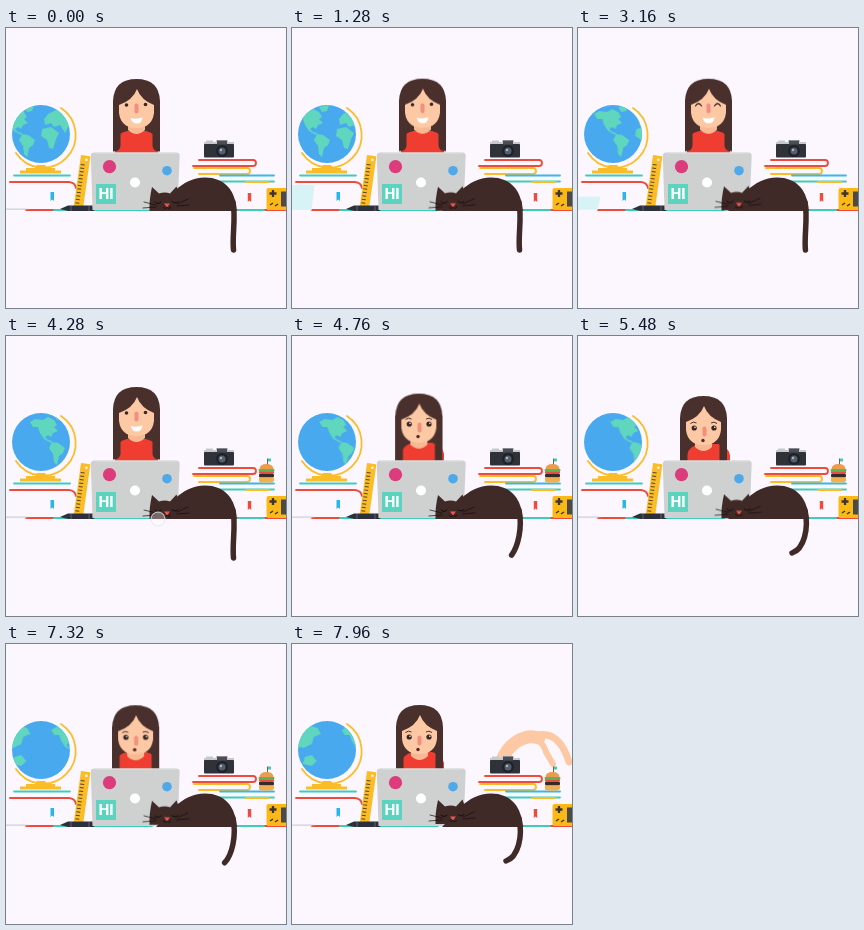
Recreate the animation shown at these times as an HTML page. Size 280 px wide and 280 px high, loop 8000 ms.

```html
<!DOCTYPE html>
<html lang="en">
<head>
<meta charset="utf-8">
<title>Desk with a sleeping cat</title>
<style>
  html, body { margin: 0; width: 100%; height: 100%; overflow: hidden; background: #fcf7ff; }
  svg { display: block; width: 100vw; height: 100vh; }
  .line { fill: none; stroke-width: 1.8; stroke-linecap: round; }
  .red { stroke: #ee4b3c; } .teal { stroke: #3fcdbb; } .blue { stroke: #35b9e6; } .gold { stroke: #fbbd27; }
  .skin { fill: #fdc9a4; } .hair { fill: #4a302d; } .cat { fill: #402a28; }
  .limb { fill: none; stroke: #fdc9a4; stroke-linecap: round; }
  .anim { animation: 8s linear infinite; }

  #land { animation-name: spin; }
  @keyframes spin { from { transform: translateX(11px); } to { transform: translateX(67px); } }

  #tablet { animation-name: lift; transform-origin: 0 182px; }
  @keyframes lift {
    0%, 4% { transform: scaleY(.06); animation-timing-function: ease-out; }
    16%, 33% { transform: scaleY(1); animation-timing-function: ease-in; }
    43%, 100% { transform: scaleY(.06); }
  }
  #slab { animation-name: slab; }
  @keyframes slab { 0%, 4%, 43%, 100% { fill: #ccd2d8; } 9%, 40% { fill: #d8f3f6; } }

  .face { animation-name: turn; }
  @keyframes turn {
    0%, 14%, 22%, 33%, 42%, 55% { transform: none; animation-timing-function: ease-in-out; }
    18%, 36% { transform: translateY(-.6px); animation-timing-function: ease-in-out; }
    62%, 74% { transform: translate(-5px, 9px); animation-timing-function: ease-in-out; }
    79%, 87% { transform: translate(5px, 11px); animation-timing-function: ease-in-out; }
    94%, 100% { transform: translate(-3px, 10px); }
  }
  #body { animation-name: duck; }
  @keyframes duck {
    0%, 55% { transform: none; animation-timing-function: ease-in-out; }
    62%, 100% { transform: translateY(5px); }
  }
  #look { animation-name: look; }
  @keyframes look {
    0%, 55% { transform: none; animation-timing-function: ease-in-out; }
    62%, 74% { transform: translate(1px, 6px); animation-timing-function: ease-in-out; }
    79%, 87% { transform: translate(2px, 6px); animation-timing-function: ease-in-out; }
    94%, 100% { transform: translate(0, 6px); }
  }
  #open { animation-name: open; }
  @keyframes open { 0%, 26.9% { opacity: 1; } 27%, 43.9% { opacity: 0; } 44%, 100% { opacity: 1; } }
  #shut { animation-name: shut; }
  @keyframes shut { 0%, 26.9% { opacity: 0; } 27%, 43.9% { opacity: 1; } 44%, 100% { opacity: 0; } }
  #smile { animation-name: smile; }
  @keyframes smile { 0%, 58.9% { opacity: 1; } 59%, 100% { opacity: 0; } }
  #gasp { animation-name: gasp; }
  @keyframes gasp { 0%, 58.9% { opacity: 0; } 59%, 100% { opacity: 1; } }

  #tail { animation-name: wag; }
  @keyframes wag {
    0%, 16%, 40%, 54%, 78%, 85% { d: path("M227 174C230 190 226 207 227.500 222"); animation-timing-function: ease-in-out; }
    24%, 31%, 64%, 70%, 96%, 100% { d: path("M227 174C231 193 226 213 214 217"); animation-timing-function: ease-in-out; }
  }
  #head { animation-name: nod; }
  @keyframes nod {
    0%, 11%, 31%, 45%, 58%, 75%, 85% { transform: none; animation-timing-function: ease-in-out; }
    24%, 38%, 68% { transform: translateY(-.7px); animation-timing-function: ease-in-out; }
    95%, 100% { transform: translateY(-3px); }
  }
  #bubble { animation-name: snore; transform-origin: 157px 180px; }
  @keyframes snore {
    0%, 20%, 31%, 46%, 58%, 73%, 85%, 100% { transform: scale(0); }
    26.5%, 53.5%, 80.5% { transform: scale(1); }
  }

  #burger { animation-name: serve; }
  @keyframes serve {
    0%, 44% { transform: translateX(32px); animation-timing-function: ease-out; }
    50%, 100% { transform: none; }
  }
  #arm { animation-name: reach; }
  @keyframes reach {
    0%, 94% { transform: translate(-22px, 62px); animation-timing-function: ease-out; }
    99%, 100% { transform: none; }
  }
</style>
</head>
<body>
<svg viewBox="0 0 280 280">
  <defs>
    <clipPath id="ball"><circle cx="35" cy="106" r="29"/></clipPath>
    <clipPath id="above"><path d="M180 60H280V155H251V132H180Z"/></clipPath>
  </defs>

  <!-- globe -->
  <path class="line gold" stroke-width="1.5" d="M55 80A32.500 32.500 0 1 1 10 125"/>
  <path d="M31 137H39L41 140H49V142.500H55V145.500H14V142.500H20V140H29Z" fill="#fbbd27"/>
  <circle cx="35" cy="106" r="29" fill="#49a9ee"/>
  <g clip-path="url(#ball)">
    <g id="land" class="anim" fill="#5fd6bd">
      <path d="M-17 86L-12 83-4 84 1 81 7 84 10 89 7 91 11 95 6 97 4 101 1 99-2 101 1 104 5 105 4 107-3 103-7 97-9 91-14 91Z"/>
      <path d="M5 106L11 107 18 112 16 117 12 120 10 129 7 126 6 118 2 112Z"/>
      <path d="M7 79L17 77 15 83 10 84Z"/>
      <path d="M27 91L31 86 39 82 62 82 65 89 58 93 56 102 51 99 48 105 43 97 37 99 34 95 28 97Z"/>
      <path d="M25 101L34 99 42 105 39 111 36 121 32 120 30 112 24 108Z"/>
      <path d="M-72 83L-52 81-41 84-38 90-45 93-47 100-55 104-59 103-64 107-70 98Z"/>
      <path d="M-54 113L-47 111-42 117-47 122-56 120Z"/>
    </g>
  </g>

  <!-- left books -->
  <path class="line teal" d="M8 147.500H64"/>
  <path class="line red" d="M4 154H63Q69 154.500 70 160"/>
  <path d="M44.500 164H48V173L46.200 171.500 44.500 173Z" fill="#2bb5e8"/>

  <!-- woman -->
  <g class="face anim">
    <path class="hair" d="M107 122V73Q108 51 130.500 51T154 73V122Z"/>
  </g>
  <path id="body" class="anim" d="M109 145V114Q110 106 121 103H140Q151 106 152 114V145Z" fill="#ef3d32"/>
  <g class="face anim">
    <path class="hair" d="M107 73H114.500V118Q114 123.500 107 123.500ZM154 73H146.500V118Q147 123.500 154 123.500Z"/>
    <path d="M122 94H139V102Q130.500 110 122 102Z" fill="#f7b994"/>
    <path class="skin" d="M113 77Q127 72 131 61 135 72 148 77V85Q146 100 130.500 100T113 85Z"/>
    <g id="look" class="anim">
      <g id="open" class="anim" fill="#3b2626">
        <circle cx="120.500" cy="77" r="1.800"/><circle cx="139.500" cy="76.500" r="1.800"/>
      </g>
      <g id="shut" class="anim" fill="none" stroke="#3b2626" stroke-width="1.300" stroke-linecap="round">
        <path d="M117.500 78Q120.500 73.500 123.500 78M136.500 78Q139.500 73.500 142.500 78"/>
      </g>
      <path d="M130.500 77.500V83.500" stroke="#f28f80" stroke-width="4" stroke-linecap="round"/>
      <path id="smile" class="anim" d="M124.500 90Q130.500 91.500 136.500 89.500 136 95.500 131 95.500T124.500 90Z" fill="#fff"/>
      <g id="gasp" class="anim">
        <path d="M116.500 72.500Q119.500 70 122.500 72M137 72Q140 70 143 72.500" fill="none" stroke="#4a302d"/>
        <circle cx="120.200" cy="77" r="2.600" fill="#3b2626"/><circle cx="140" cy="77" r="2.600" fill="#3b2626"/>
        <circle cx="121" cy="76.200" r=".8" fill="#fff"/><circle cx="140.800" cy="76.200" r=".8" fill="#fff"/>
        <circle cx="129" cy="89.500" r="1.700" fill="#5c2424"/>
      </g>
    </g>
  </g>

  <!-- reaching arm -->
  <g clip-path="url(#above)">
    <g id="arm" class="anim">
      <path class="limb" stroke-width="13" d="M210 117C215 101 232 89 247 94"/>
      <path class="limb" stroke-width="7" d="M246 91C263 88 272 102 277 118"/>
      <path class="limb" stroke-width="6" d="M246 96Q252 101 254 108L261 120"/>
    </g>
  </g>

  <!-- right books -->
  <path class="line red" d="M193 132H247Q250 132 250 135T247 138H187"/>
  <path class="line gold" d="M188 140H241Q244 140 244 143T241 146H193"/>
  <path class="line blue" d="M214 147.500H268"/>
  <path class="line teal" d="M210 153.500H268"/>
  <path class="line gold" d="M240 154H263"/>
  <path d="M241.800 165H245.200V174L243.500 172.500 241.800 174Z" fill="#ee4b3c"/>

  <!-- camera -->
  <path d="M198 117V114H200V112.500H207V114H210V112H222V114H228V117Z" fill="#c5c9cc"/>
  <rect x="198" y="116" width="30" height="13.500" rx="1" fill="#30323a"/>
  <rect x="211" y="112.500" width="10" height="4" fill="#4b4c55"/>
  <circle cx="216" cy="123" r="6" fill="#202229"/>
  <circle cx="216" cy="123" r="3.500" fill="#555e6c"/>
  <circle cx="215" cy="122" r="1.200" fill="#a9b8c5"/>

  <!-- burger -->
  <g id="burger" class="anim">
    <path d="M261.500 122.500V129" stroke="#8a5a3a"/>
    <path d="M262 122.500H265V125.500H262Z" fill="#3fcdbb"/>
    <path d="M253.500 133Q254 128 260.500 128T267.500 133Z" fill="#eb9c4c"/>
    <rect x="252.500" y="133" width="16" height="2.200" rx="1" fill="#59b75a"/>
    <rect x="253" y="135.200" width="15" height="2.200" fill="#e84d3d"/>
    <rect x="253" y="137.400" width="15" height="4" rx="1.500" fill="#38292a"/>
    <path d="M253 141.400H268V144.500Q267 146.500 265 146.500H256Q253 146.500 253 144.500Z" fill="#f0b04e"/>
  </g>

  <!-- desk edge and small things -->
  <path class="line red" d="M20 182H56M172 182H280"/>
  <path class="line teal" d="M48 182H60M86 182H146M232 182H258"/>
  <g id="tablet" class="anim">
    <path id="slab" class="anim" d="M0 157H22.500L19.500 182H0Z" fill="#d8f3f6"/>
  </g>
  <g transform="translate(75 127) rotate(8)">
    <rect width="9.500" height="53" rx=".5" fill="#fbbd27"/>
    <path d="M3 9V51" stroke="#584326" stroke-width="4" stroke-dasharray="1 2.500"/>
    <circle cx="6" cy="4" r="1.300" fill="#fcf7ff"/>
  </g>
  <path d="M54 181L62 177.500H87Q89 178 89 180.500T87 183H62Z" fill="#2d303a"/>
  <path d="M65 178V183M83 178V183" stroke="#5d6570"/>

  <!-- handheld console -->
  <rect x="260.500" y="160" width="24" height="22" rx="2" fill="#fbb916"/>
  <path d="M267 162V169M263.500 165.500H270.500" stroke="#40342c" stroke-width="2.300"/>
  <path d="M264 177L267 175M269 178L272 176" stroke="#40342c" stroke-width="1.500"/>
  <rect x="275" y="163.500" width="8" height="15" fill="#4d4a45"/>

  <!-- laptop -->
  <path d="M88.500 124.500H170Q174 124.500 173.700 128L171.500 182H86.500L84.800 128Q84.500 124.500 88.500 124.500Z" fill="#cfd1d1"/>
  <path d="M89 125H170" stroke="#dfe1e1"/>
  <circle cx="103.500" cy="138.700" r="6.600" fill="#dc3c7c"/>
  <circle cx="129" cy="154.500" r="5" fill="#fff"/>
  <circle cx="161" cy="142.700" r="4.800" fill="#4fa9e8"/>
  <rect x="90" y="156" width="20" height="20" fill="#5cd3bf"/>
  <text x="100" y="171" text-anchor="middle" font-family="Lato, sans-serif" font-size="14" font-weight="900" fill="#fff">HI</text>

  <!-- cat -->
  <path id="tail" class="anim" d="M227 174C230 190 226 207 227.500 222" fill="none" stroke="#402a28" stroke-width="5.500" stroke-linecap="round"/>
  <path class="cat" d="M150 183C162 172 174 149.500 199 149.500 219 149.500 230 163 230.500 183Z"/>
  <g id="head" class="anim">
    <path class="cat" d="M143.500 183Q143 172 146 159L153 165.500Q159 163.500 164 165.500L170.500 158.500Q175 170 176 183Z"/>
    <g fill="none" stroke="#130d0d" stroke-linecap="round">
      <path d="M149 174Q152 177 155 174M166 173.500Q169 176.500 172 173.500"/>
      <path d="M150 177L138 174M150 179L137 180M171 176L182 171M171 178L183 177" stroke-width=".7"/>
    </g>
    <path d="M158 175.500H164L161 179.500Z" fill="#ef5550"/>
    <path d="M157 179Q159 182 161 179.500 163 182 165 179" fill="none" stroke="#130d0d" stroke-width=".8"/>
  </g>
  <circle id="bubble" class="anim" cx="152" cy="183" r="7" fill="#fff" fill-opacity=".3" stroke="#dfe8ec" stroke-width="1"/>
</svg>
</body>
</html>
```
